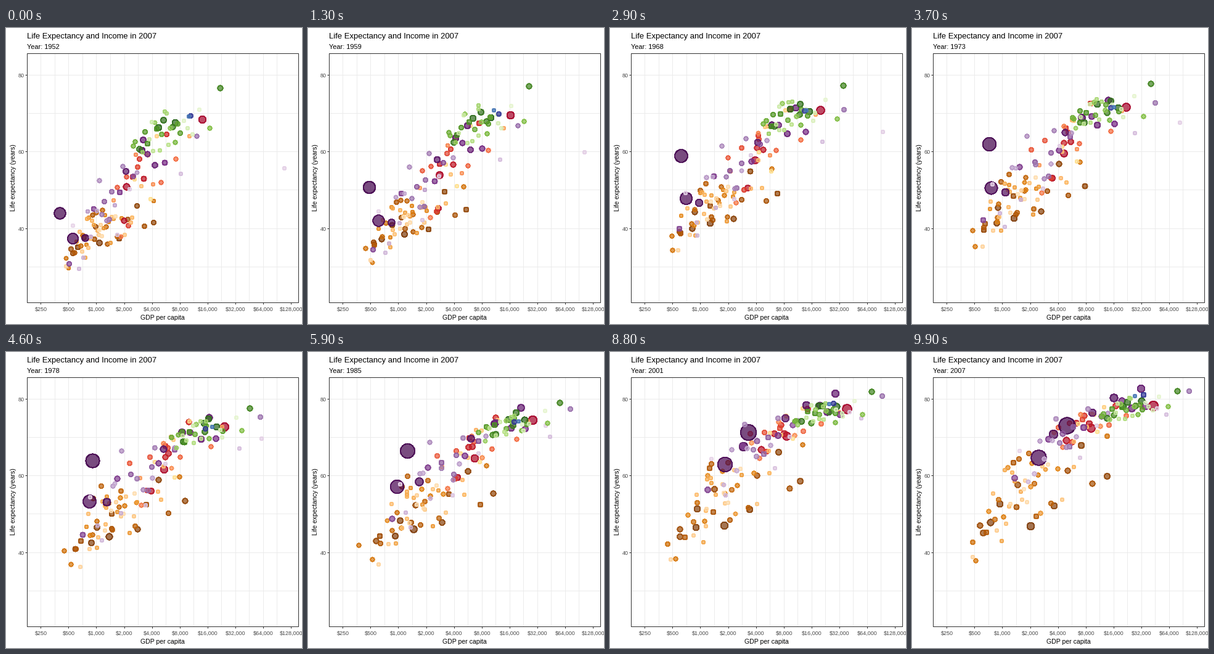
A matplotlib script that plays this animation: 480 px wide and 480 px high, repeating every 10 s.

```python
import matplotlib.pyplot as plt
import numpy as np
from matplotlib.animation import FuncAnimation
from matplotlib.colors import LinearSegmentedColormap
from matplotlib.patches import Rectangle

FRAMES, INTERVAL = 100, 100
START, END, STEPS = 1952, 2007, 11
LEFT, RIGHT, TOP, BOTTOM = 34, 474, 41, 445
rng = np.random.default_rng(12)

# Each region: dot count, top population (millions) and its early share,
# income (log2 of thousands) and lifespan as mean and spread over time,
# and a colour ramp from most to least populous
REGIONS = {
    "africa": dict(
        count=52, top=85, early=0.33,
        income=((0, 0.55, 0.6), (0.75, 0.9, 1.15)),
        life=((39.2, 50.3, 55.5), (4.6, 6, 8.5)),
        ramp=["#7f3b08", "#b35806", "#e08214", "#fdb863", "#fee0b6"]),
    "america": dict(
        count=25, top=130, early=0.4,
        income=((1.55, 2.5, 2.95), (0.65, 0.7, 0.75)),
        life=((53, 65.3, 73.5), (8, 6, 3.2)),
        ramp=["#a50026", "#d73027", "#f46d43", "#fdae61", "#fee090"]),
    "asia": dict(
        count=33, top=250, early=0.4,
        income=((0.6, 1.9, 2.6), (1.1, 1.5, 1.5)),
        life=((46.5, 61, 70.5), (8.5, 8, 6)),
        ramp=["#40004b", "#762a83", "#9970ab", "#c2a5cf", "#e7d4e8"]),
    "europe": dict(
        count=30, top=90, early=0.8,
        income=((2.4, 3.8, 4.5), (0.75, 0.6, 0.65)),
        life=((65.5, 72.3, 77.6), (4.5, 2.1, 2.4)),
        ramp=["#276419", "#4d9221", "#7fbc41", "#b8e186", "#e6f5d0"]),
    "oceania": dict(
        count=2, top=20, early=0.45,
        income=((3.35, 4.1, 4.9), (0.05, 0.05, 0.25)),
        life=((69.2, 73.3, 80.7), (0.1, 0.4, 0.4)),
        ramp=["#313695", "#4575b4"]),
}
# The most striking dots: rank, final population, incomes, lifespans
LEADERS = {
    "asia": [
        (0, 1319, (0.4, 0.65, 1.48, 4.96), (44, 61.2, 67.9, 73)),
        (1, 1110, (0.55, 0.72, 1.05, 2.45), (37.4, 49.3, 59.3, 64.7)),
        (2, 224, (0.75, 0.98, 1.95, 3.54), (37.5, 47.8, 61.2, 70.7)),
        (5, 127, (3.2, 13, 24, 31.7), (63, 72.6, 79, 82.6)),
        (31, 2.5, (108, 95, 31, 47.3), (55.6, 66.5, 74.7, 77.6)),
    ],
    "america": [
        (0, 301, (14, 20.9, 30.7, 43), (68.4, 71, 75.5, 78.2)),
        (1, 190, (2.1, 4.3, 7.5, 9.1), (50.9, 58.7, 66, 72.4)),
    ],
    "africa": [(0, 135, (1.08, 1.3, 1.5, 2), (36.3, 42, 47.2, 46.9))],
    "europe": [(0, 82, (7.1, 17, 25.3, 32.2), (67.5, 70.9, 75.4, 79.4))],
}

xs, ys, sizes, colors = [], [], [], []


def to_x(log_income):
    return 146.45 + 45.07 * log_income


def to_y(life):
    return 75.6 + 6.2246 * (80 - life)


def trend(values):
    """Lay evenly spaced key values over the five-year steps."""
    stops = np.linspace(0, STEPS, len(values))
    return np.interp(np.arange(STEPS + 1), stops, values)


def drift(step):
    """Random walk that starts and ends at zero."""
    walk = np.cumsum(rng.normal(0, step, STEPS + 1))
    return walk - np.linspace(walk[0], walk[-1], STEPS + 1)


def diameter(pop):
    size = 2 + 10 * np.sqrt(pop / 1319)
    return 0.75 * (size * 2.845 + 0.94)


def add(region, rank, pop, log_income, life):
    ramp = LinearSegmentedColormap.from_list("ramp", region["ramp"])
    xs.append(to_x(log_income))
    ys.append(to_y(life))
    sizes.append((diameter(pop * region["early"]), diameter(pop)))
    colors.append(ramp(rank / (region["count"] - 1))[:3])


def add_crowd(region, taken):
    count = region["count"]
    ranks = [r for r in range(count) if r not in taken]
    p = (np.arange(len(ranks)) + 0.5) / len(ranks)
    wealth = rng.permutation(np.clip(np.log(p / (1 - p)) / 1.7, -1.9, 2))
    for rank, u in zip(ranks, wealth):
        health = 0.7 * u + 0.7 * np.clip(rng.normal(), -1.5, 1.5)
        skewed = (np.exp(0.3 * u) - 1) / 0.3
        mean, spread = map(trend, region["income"])
        log_income = mean + skewed * spread + drift(0.1)
        mean, spread = map(trend, region["life"])
        life = np.minimum(mean + health * spread + drift(0.5), 82)
        pop = region["top"] * np.exp(-5.2 * rank / (count - 1))
        add(region, rank, pop, log_income, life)


for name, region in REGIONS.items():
    leaders = LEADERS.get(name, [])
    for rank, pop, income, life in leaders:
        add(region, rank, pop, trend(np.log2(income)), trend(life))
    add_crowd(region, {leader[0] for leader in leaders})
xs, ys, sizes = np.array(xs), np.array(ys), np.array(sizes)

plt.rcParams["font.family"] = "Liberation Sans"
fig = plt.figure(figsize=(480 / 72, 480 / 72), dpi=72, facecolor="white")
ax = fig.add_axes([0, 0, 1, 1])
ax.set_xlim(0, 480)
ax.set_ylim(480, 0)
ax.axis("off")


def line(x, y, color):
    ax.plot(x, y, color=color, lw=1, solid_capstyle="butt", zorder=1)


def label(x, y, text, size, color="black", **kw):
    return ax.text(x, y, text, fontsize=size, color=color, **kw)


for k in range(18):
    x = to_x(-2 + k / 2)
    line([x, x], [TOP, BOTTOM], "#ebebeb")
for life in range(30, 81, 10):
    y = to_y(life)
    line([LEFT, RIGHT], [y, y], "#ebebeb")

for k in range(10):
    x = to_x(k - 2)
    line([x, x], [BOTTOM, BOTTOM + 3], "#333333")
    label(x + 0.5, 459, f"${250 * 2**k:,}", 9, "#4d4d4d", ha="center")
for life in (40, 60, 80):
    y = to_y(life)
    line([LEFT - 3, LEFT], [y, y], "#333333")
    label(29.5, y + 4.4, str(life), 9, "#4d4d4d", ha="right")

label(34, 17, "Life Expectancy and Income in 2007", 13)
year_text = label(34, 34, "", 11)
label(254, 473, "GDP per capita", 10.5, ha="center")
label(17, 243, "Life expectancy (years)", 10.5, rotation=90,
      ha="right", va="center")

dots = ax.scatter(xs[:, 0], ys[:, 0], s=sizes[:, 0] ** 2,
                  facecolors=[(*c, 0.7) for c in colors],
                  edgecolors=[(*c, 0.8) for c in colors],
                  linewidths=1, antialiased=False, zorder=3)
ax.add_patch(Rectangle((LEFT, TOP), RIGHT - LEFT, BOTTOM - TOP, fill=False,
                       edgecolor="#333333", lw=1, zorder=4))


def draw(frame):
    t = frame / (FRAMES - 1)
    k = min(int(t * STEPS), STEPS - 1)
    w = t * STEPS - k
    x = xs[:, k] * (1 - w) + xs[:, k + 1] * w
    y = ys[:, k] * (1 - w) + ys[:, k + 1] * w
    dots.set_offsets(np.round(np.column_stack([x, y])) + 0.5)
    dots.set_sizes((sizes[:, 0] * (1 - t) + sizes[:, 1] * t) ** 2)
    year_text.set_text(f"Year: {round(START + (END - START) * t)}")
    return dots, year_text


anim = FuncAnimation(fig, draw, frames=FRAMES, interval=INTERVAL,
                     repeat=True, repeat_delay=0)
plt.show()
```
